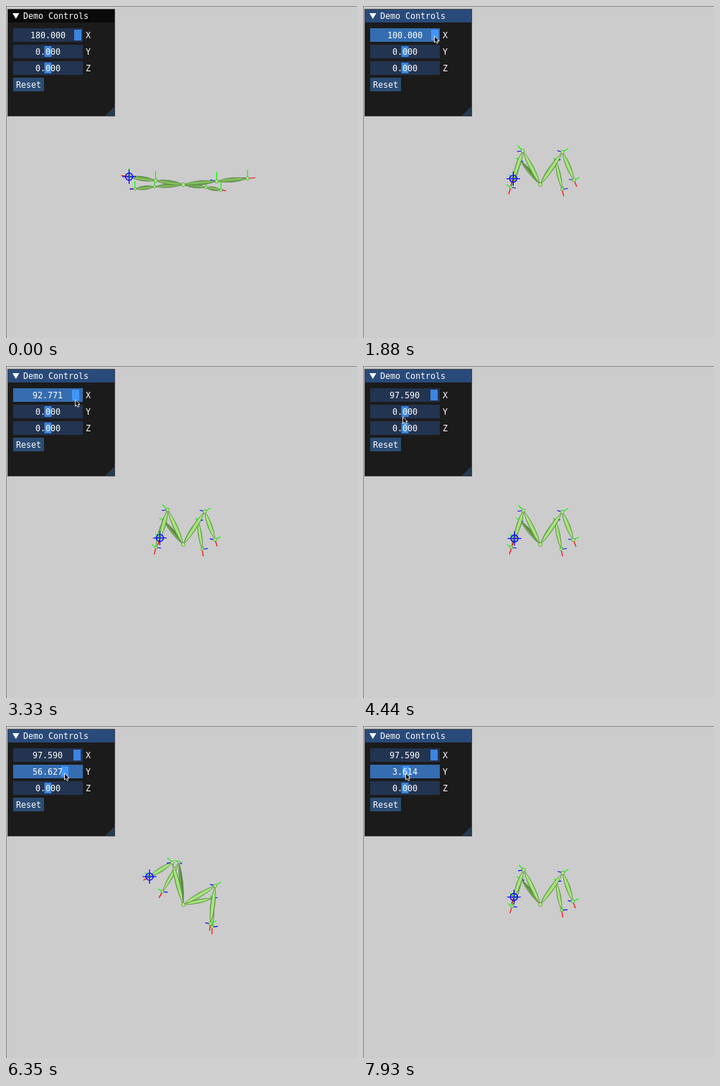
These frames come from a looping animation (489 by 463 pixels, 8000 ms). An HTML page with a canvas:

```html
<!DOCTYPE html>
<html lang="en">
<head>
<meta charset="utf-8">
<title>Demo Controls</title>
<style>
html, body { margin: 0; width: 100%; height: 100%; overflow: hidden; background: #ccc; }
canvas { display: block; }
</style>
</head>
<body>
<canvas id="stage" width="489" height="463"></canvas>
<script>
const ctx = document.getElementById('stage').getContext('2d');
const LOOP = 8000, ROOT = [247, 249];

// Slider moves: start, end, number of steps, final notch (0..83)
const MOVES_X = [[1970, 2410, 6, 68], [2780, 3330, 7, 80], [3610, 3700, 2, 82]];
const MOVES_Y = [[5010, 5011, 1, 43], [5400, 5580, 3, 50], [5670, 5940, 4, 70],
  [6350, 6890, 7, 38], [6980, 7150, 3, 20], [7250, 7251, 1, 17], [7740, 7930, 3, 43]];

// Each joint: position, shift with Y, shift with X, green axis, blue axis
const BENT = [
  { far: 1, knee: [219, 215, 8, -9, .5, 0, -6, -3, 4, 2], foot: [207, 253, 4, -8, 3, 0, -6, -4, 7, 1] },
  { far: 1, knee: [268, 215.5, 7, 9, -1, .5, -3, -4, 7, -1], foot: [276, 255.5, 4, 9, -4, 0, 2, -4, 8, -1] },
  { knee: [223.5, 201.5, 3, -4, 2.5, -1.5, -7, -7, -8, 1], foot: [211, 240.5, -4, -11, 5, -1, -6, -6, 0, 0] },
  { knee: [277.5, 203.5, 5, 7, -1, -.7, 8, -5, -7, -2], foot: [293, 242.5, -3, 12, -3, -.7, 8, -4, -7, -1] }
];
const FLAT = [
  { far: 1, knee: [207, 252, 0, -7, 0, 0], foot: [179.5, 255, 0, -11, -7, 0] },
  { far: 1, knee: [278.5, 253, 0, -5, 8, 1], foot: [299.5, 256.5, 0, -11, 3, 0] },
  { knee: [208.5, 243.5, 0, -13, 0, 0], foot: [171.5, 238, 0, -12, 0, 0] },
  { knee: [293.5, 244.5, 0, -13, -9, -2], foot: [336.5, 240.5, 0, -12, -8, -1] }
];

const degrees = n => n * 200 / 83 - 100;
const within = (t, a, b) => t >= a && t < b;

function notch(moves, v, t) {
  for (const [a, b, steps, to] of moves) {
    if (t < a) break;
    const i = Math.min(steps, 1 + Math.floor((t - a) / (b - a) * (steps - 1) + .01));
    v = Math.round(v + (to - v) * i / steps);
  }
  return v;
}

function line(x, y, dx, dy, color) {
  ctx.strokeStyle = color;
  ctx.lineWidth = 1.2;
  ctx.beginPath();
  ctx.moveTo(x, y);
  ctx.lineTo(x + dx, y + dy);
  ctx.stroke();
}

function path(points, fill) {
  ctx.fillStyle = fill;
  ctx.beginPath();
  points.forEach(p => ctx.lineTo(...p));
  ctx.closePath();
  ctx.fill();
}

function rect(x, y, w, h, fill) {
  ctx.fillStyle = fill;
  ctx.fillRect(x, y, w, h);
}

function text(s, x, y) {
  ctx.fillStyle = '#fff';
  ctx.fillText(s, x, y);
}

// Spindle shaded across its width
function bone([ax, ay], [bx, by], width, tones) {
  const dx = bx - ax, dy = by - ay, len = Math.hypot(dx, dy) || 1;
  const mx = (ax + bx) / 2, my = (ay + by) / 2;
  const px = -dy / len * width, py = dx / len * width;
  const g = ctx.createLinearGradient(mx - px / 2, my - py / 2, mx + px / 2, my + py / 2);
  tones.forEach((c, i) => g.addColorStop(i / (tones.length - 1), c));
  ctx.beginPath();
  ctx.moveTo(ax, ay);
  ctx.quadraticCurveTo(mx + px, my + py, bx, by);
  ctx.quadraticCurveTo(mx - px, my - py, ax, ay);
  ctx.fillStyle = g;
  ctx.fill();
  ctx.strokeStyle = '#5c8945';
  ctx.lineWidth = .8;
  ctx.stroke();
}

function ball(x, y, r) {
  ctx.beginPath();
  ctx.arc(x, y, r, 0, 7);
  ctx.fillStyle = '#aaf07c';
  ctx.fill();
  ctx.strokeStyle = '#62964a';
  ctx.lineWidth = .8;
  ctx.stroke();
}

function creature(flat, degX, degY) {
  const u = degY / 20.48, v = (97.59 - degX) / 7.23;
  const pose = j => flat ? j : [j[0] + u * j[2] + v * j[4], j[1] + u * j[3] + v * j[5], ...j.slice(6)];
  const bright = ['#6da14f', '#a6e87a', '#a6e87a', '#77ad58'];
  const dim = ['#8fc76a', '#66914d', '#527a3e'];
  const low = ['#55803d', '#8cc964', '#76ad54', '#567c40'];
  const legs = (flat ? FLAT : BENT).map(l => ({ far: l.far, knee: pose(l.knee), foot: pose(l.foot) }));
  legs.forEach(({ far, knee, foot }, i) => {
    const k = knee.slice(0, 2), f = foot.slice(0, 2);
    const dx = f[0] - k[0], dy = f[1] - k[1], len = Math.hypot(dx, dy) || 1;
    const red = flat ? (far ? 7 : 11) : 10;
    line(...f, dx / len * red, dy / len * red, '#f00');
    for (const j of [knee, foot]) line(j[0], j[1], j[4], j[5], '#00f');
    bone(ROOT, k, far ? 5 : 6, flat ? low : i == 0 ? dim : bright);
    bone(k, f, far ? 5 : 6, flat ? low : bright);
    for (const j of [knee, foot]) {
      line(j[0], j[1], j[2], j[3], '#0f0');
      ball(j[0], j[1], far ? 2 : 2.4);
    }
  });
  ball(...ROOT, 2.6);

  const [x, y] = legs[2].foot;
  ctx.strokeStyle = '#00f';
  ctx.lineWidth = 1.4;
  ctx.beginPath();
  ctx.arc(x, y, 5, 0, 7);
  ctx.stroke();
  line(x - 9.5, y, 19, 0, '#00f');
  line(x, y - 10, 0, 20, '#00f');
}

function slider(y, label, n, value, state) {
  rect(10, y, 97, 19, ['#233450', '#2b4c74', '#356db0'][state]);
  rect(12 + n, y + 2, 10, 15, state == 2 ? '#4296fa' : '#3d85e0');
  const s = value.toFixed(3);
  text(s, Math.floor(58.5 - s.length * 3.5), y + 14);
  text(label, 111, y + 14);
}

function pointer(t, nx, ny) {
  if (t < 1340 || within(t, 2600, 2780) || within(t, 3970, 4440) || within(t, 5400, 6350)) return;
  let x, y;
  if (t < 3790) [x, y] = [16.5 + nx, t < 1970 ? 42 : t < 2780 ? 46 : 47];
  else if (t < 3970) [x, y] = [95, 52];
  else if (t < 4530) [x, y] = [55.5, 71];
  else if (t < 4620) [x, y] = [56, 80];
  else if (t < 5010) [x, y] = [58, 69];
  else [x, y] = [16.5 + ny, 66];
  const shape = [[0, 0], [0, 9], [2, 7.3], [3.6, 10.3], [5.2, 9.5], [3.9, 6.6], [6.5, 6.4]];
  path(shape.map(([a, b]) => [x + a, y + b]), '#000');
  ctx.strokeStyle = '#fff';
  ctx.lineWidth = .9;
  ctx.stroke();
}

function draw(now) {
  const t = now % LOOP, flat = t < 1340;
  const nx = notch(MOVES_X, 83, t), ny = notch(MOVES_Y, 41.5, t);
  const degX = flat ? 180 : degrees(nx), degY = degrees(ny);

  rect(0, 0, 489, 463, '#ccc');
  rect(0, 0, 489, 1, '#888');
  rect(0, 0, 1, 463, '#888');
  creature(flat, degX, degY);

  rect(2, 4, 150, 150, '#45454c');
  rect(3, 5, 148, 148, '#1b1b1b');
  rect(3, 5, 148, 18, flat ? '#0a0a0a' : '#294a7a');
  path([[9, 10], [18.5, 10], [13.75, 18]], '#fff');
  path([[151, 140], [151, 153], [138, 153]], '#25394f');
  ctx.font = '11.63px "DejaVu Sans Mono", monospace';
  text('Demo Controls', 24, 18);

  const stateX = within(t, 1340, 3790) ? 2 : within(t, 90, 3970) ? 1 : 0;
  const stateY = t >= 5010 ? 2 : t >= 4620 ? 1 : 0;
  slider(31, 'X', nx, degX, stateX);
  slider(54, 'Y', ny, degY, stateY);
  slider(77, 'Z', 41.5, 0, within(t, 4530, 4620) ? 1 : 0);
  rect(10, 100, 43, 19, '#2b4c74');
  text('Reset', 14, 114);
  pointer(t, nx, ny);
}

const start = performance.now();
function tick() {
  draw(performance.now() - start);
  requestAnimationFrame(tick);
}
tick();
</script>
</body>
</html>
```
